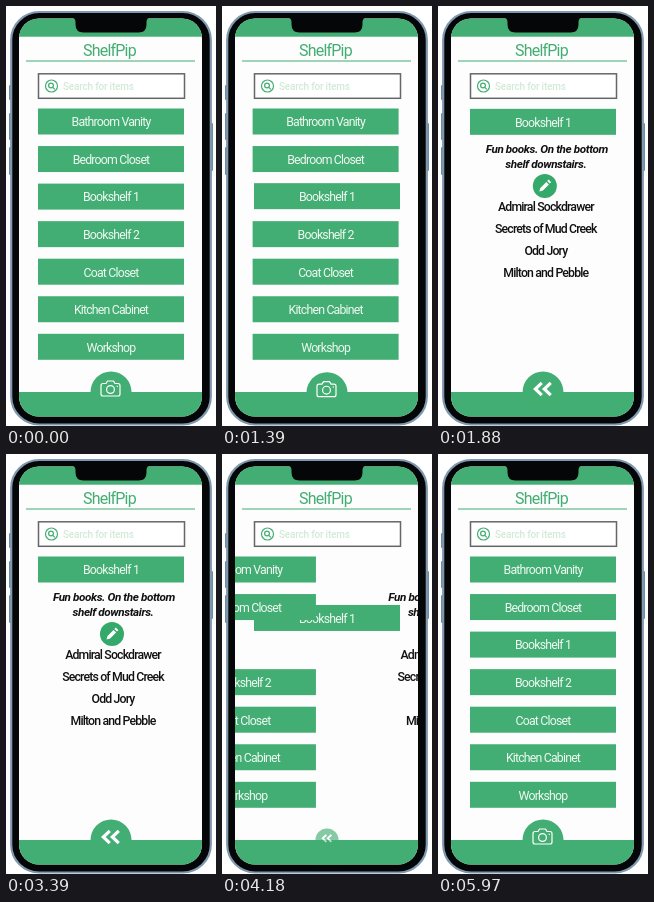
Write an HTML page that moves like this. It is 210 px wide and 420 px high and loops after 6000 ms.

```html
<!DOCTYPE html>
<html lang="en">
<head>
<meta charset="utf-8">
<title>Home inventory app</title>
<style>
  html, body { margin: 0; width: 100%; height: 100%; overflow: hidden; background: #fff; }
  svg { display: block; width: 100vw; height: 100vh; }
  text { font-family: Roboto, "Liberation Sans", sans-serif; text-anchor: middle; }
  .green { fill: #43ae73; }
  .label { font-size: 12.3px; letter-spacing: -.8px; fill: #f0f9f3; }
  .item { font-size: 12.3px; letter-spacing: -.85px; font-weight: 500; fill: #111; }
  .note { font-size: 11.7px; letter-spacing: -.4px; font-weight: 700; font-style: italic; fill: #111; }
  .title { font-size: 16px; letter-spacing: -.8px; fill: #43ae73; }
  .hint { font-size: 10px; letter-spacing: -.2px; font-weight: 500; text-anchor: start; fill: #d2ead8; }
  .line { fill: none; stroke: #fff; stroke-linejoin: round; }
</style>
</head>
<body>
<svg viewBox="0 0 210 420">
  <defs>
    <clipPath id="screen"><rect x="13" y="12.5" width="183" height="398" rx="20"/></clipPath>
  </defs>

  <g fill="#6f8ca3">
    <rect x="3" y="79" width="3" height="15" rx="1"/>
    <rect x="3" y="107" width="3" height="27" rx="1"/>
    <rect x="3" y="141" width="3" height="28" rx="1"/>
    <rect x="204" y="117" width="3" height="48" rx="1"/>
  </g>
  <rect x="5.2" y="6" width="199.6" height="412.5" rx="28" fill="#050608" stroke="#7f98ae" stroke-width="2.2"/>

  <g clip-path="url(#screen)">
    <rect x="13" y="12" width="183" height="400" fill="#fdfdfe"/>
    <rect class="green" x="13" y="12" width="183" height="18.700"/>
    <text class="title" x="103.5" y="49.7">ShelfPip</text>
    <path d="M20 55H189" stroke="#43ae73" stroke-width="1.2"/>
    <rect x="32.5" y="67.800" width="146" height="24.5" fill="#fff" stroke="#666668" stroke-width="1.5"/>
    <g fill="none" stroke="#43ae73" stroke-width="1.2">
      <circle cx="45.5" cy="80" r="6"/>
      <circle cx="45" cy="79.5" r="2.4"/>
      <path d="M46.8 81.3l2 2"/>
    </g>
    <text class="hint" x="57" y="83.8">Search for items</text>

    <g id="shelf"></g>
    <g id="rooms"></g>
    <g id="details">
      <text class="note" x="108" y="147.4">Fun books. On the bottom</text>
      <text class="note" x="107" y="161.900">shelf downstairs.</text>
      <circle cx="106" cy="180" r="12" fill="#35a969"/>
      <path d="M100.5 185.5l1-3.6 6-6 2.6 2.6-6 6zM108.4 175l1.4-1.4 2.6 2.6-1.4 1.4z" fill="#fff"/>
    </g>

    <rect class="green" x="13" y="386" width="183" height="28"/>
    <g id="back">
      <circle class="green" r="20.500"/>
      <path class="line" stroke-width="3.2" style="stroke-linejoin: miter" d="M-1.2 -9.200l-6.500 6.200 6.500 6.200M7.800 -9.200l-6.500 6.200 6.500 6.200"/>
    </g>
    <g id="camera">
      <circle class="green" cx="105" cy="386" r="20.500"/>
      <path class="line" stroke-width="1.2" d="M97 377.500h3l1.500-2.500h6l1.500 2.500h3q2 0 2 2v8.500q0 2-2 2h-15q-2 0-2-2v-8.500q0-2 2-2z"/>
      <circle class="line" stroke-width="1.2" cx="104.500" cy="383.500" r="3.900"/>
      <circle cx="111.300" cy="380.300" r=".7" fill="#fff"/>
    </g>
  </g>
  <path d="M65 11H145Q140.500 12 140.500 16V18.500Q140.500 26.500 132.500 26.500H77.500Q69.500 26.500 69.500 18.500V16Q69.500 12 65 11Z" fill="#050608"/>
</svg>

<script>
  const LOOP = 6000, MORPH = 535, OPEN_AT = 1367, CLOSE_AT = 3861;
  const TOP = 102.5, PITCH = 37.55, SHELF = 2;
  const rooms = ["Bathroom Vanity", "Bedroom Closet", "Bookshelf 1", "Bookshelf 2",
    "Coat Closet", "Kitchen Cabinet", "Workshop"];
  const books = ["Admiral Sockdrawer", "Secrets of Mud Creek", "Odd Jory", "Milton and Pebble"];
  const part = id => document.getElementById(id);

  const button = (name, y) => `<rect class="green" x="32" y="${y}" width="146" height="26"/>
    <text class="label" x="105" y="${y + 17.8}">${name}</text>`;

  rooms.forEach((name, i) => {
    if (i === SHELF) part("shelf").innerHTML = button(name, TOP);
    else part("rooms").innerHTML += button(name, TOP + i * PITCH);
  });
  books.forEach((name, i) => {
    part("details").innerHTML += `<text class="item" x="107" y="${205.2 + i * 21.8}">${name}</text>`;
  });

  const ease = t => {
    t = Math.min(1, Math.max(0, t));
    return t * t * (3 - 2 * t);
  };
  const move = (id, x, y) => part(id).setAttribute("transform", `translate(${x} ${y})`);

  function draw(time) {
    // 0 shows the room list, 1 shows the opened shelf
    const open = ease((time - OPEN_AT) / MORPH) - ease((time - CLOSE_AT) / MORPH);
    const home = 1 - open;
    move("rooms", -237 * open, 0);
    move("shelf", 0, SHELF * PITCH * home);
    move("details", 185 * home, 0);
    move("camera", 0, 110 * open);
    part("back").setAttribute("transform", `translate(105 386) scale(${1 - 0.68 * home})`);
    part("back").setAttribute("opacity", 1 - 0.55 * home);
  }

  const start = performance.now();
  function tick() {
    draw((performance.now() - start) % LOOP);
    requestAnimationFrame(tick);
  }
  tick();
</script>
</body>
</html>
```
